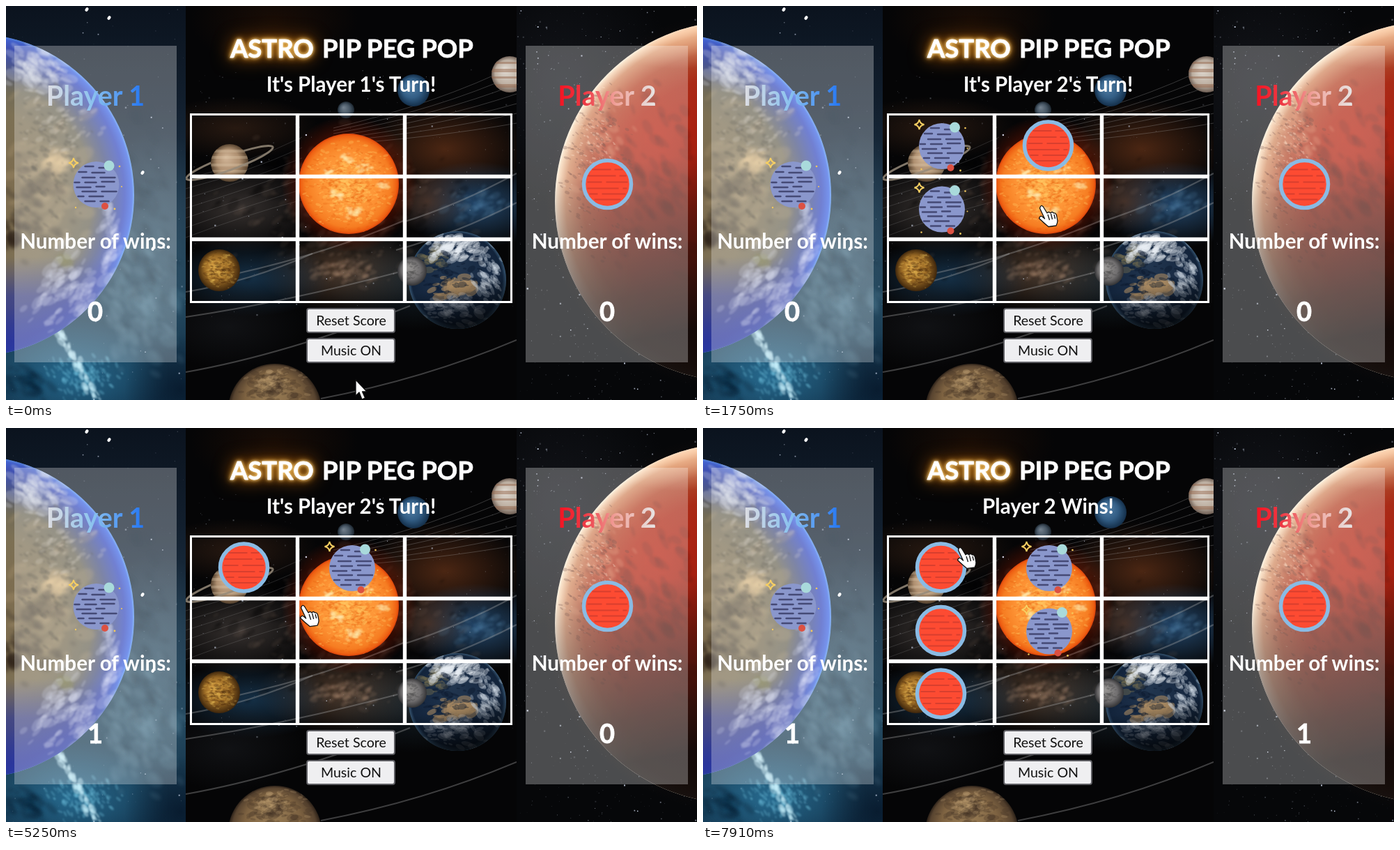
Write an HTML page with a canvas that moves like this. It is 992 px wide and 565 px high and loops after 8000 ms.

```html
<!DOCTYPE html>
<html lang="en">
<head>
<meta charset="utf-8">
<title>Astro Pip Peg Pop</title>
<style>
html, body { margin: 0; width: 992px; height: 565px; overflow: hidden; background: #000; }
canvas, svg { position: absolute; left: 0; top: 0; display: block; }
text { font-family: Lato, "Open Sans", sans-serif; font-weight: 700; fill: #fff; }
.mid { text-anchor: middle; }
.title { font-size: 36.5px; stroke: #fff; stroke-width: .8; stroke-linejoin: round; }
.lit { filter: drop-shadow(0 0 2px #ffdf9c) drop-shadow(0 0 4px #dd9a2a) drop-shadow(0 0 12px #8a4706); }
.status { font-size: 29.5px; }
.name { font-size: 39.5px; }
.wins { font-size: 29.7px; }
.score { font-size: 38px; stroke: #fff; stroke-width: .8; }
.button rect { fill: #efeff1; stroke: #5d5d62; stroke-width: 2; }
.button text { font-size: 19.6px; font-weight: 400; fill: #111; }
</style>
</head>
<body>
<canvas id="sky" width="992" height="565"></canvas>
<svg width="992" height="565" viewBox="0 0 992 565">
  <defs>
    <linearGradient id="blue" gradientUnits="userSpaceOnUse" x1="60" x2="197">
      <stop stop-color="#dcdde3"/><stop offset=".45" stop-color="#8fc4ee"/><stop offset="1" stop-color="#2577f3"/>
    </linearGradient>
    <linearGradient id="red" gradientUnits="userSpaceOnUse" x1="791" x2="934">
      <stop stop-color="#f5101f"/><stop offset=".28" stop-color="#ee3a45"/><stop offset=".6" stop-color="#f0a59d"/><stop offset="1" stop-color="#e6e6e6"/>
    </linearGradient>
    <g id="p0">
      <circle cx="1.5" cy="1" r="33" fill="#8a97cc"/>
      <path transform="translate(1.5 1)" stroke="#454a76" stroke-width="2.4" stroke-linecap="round"
        d="M-16-26H-4M4-24H14M-25-18H-14M-6-17H12M-20-10H-2M6-10H27M-31-3H-24M-16-3H0M8-4H26M-28 4H-8M0 3H12M-20 10H0M8 10H29M-26 17H-18M-10 17H10M-16 24H-2M6 24H18"/>
      <circle cx="20" cy="-26" r="7.5" fill="#a9dadb"/>
      <circle cx="14" cy="32" r="5" fill="#dc5142"/>
      <path d="M-31-37Q-30-31-24-30Q-30-29-31-23Q-32-29-38-30Q-32-31-31-37Z" fill="none" stroke="#f7cf62" stroke-width="2"/>
      <g fill="#f4c95c"><circle cx="35" cy="-25" r="1.3"/><circle cx="38" cy="4" r="1"/><circle cx="28" cy="36" r="1.4"/><circle cx="-28" cy="34" r="1.2"/></g>
    </g>
    <g id="p1">
      <circle r="34" fill="#fd4b32" stroke="#8abbe4" stroke-width="5.5"/>
      <path d="M-22-21H5M10-21H22M-28-12H12M17-12H27M-29-3H-8M-2-3H29M-29 6H16M22 6H28M-26 14H-14M-8 14H26M-19 22H19" stroke="#d83f2e" stroke-width="2"/>
    </g>
  </defs>

  <g fill="#fff" fill-opacity=".28"><path d="M12 57H245V511H12zM746 57H979V511H746z"/></g>
  <text class="title lit" x="322" y="74">ASTRO</text>
  <text class="title" x="454" y="74">PIP PEG POP</text>
  <text class="status mid" id="status" x="495.5" y="123"></text>

  <text class="name mid" x="128.5" y="143" style="fill:url(#blue)">Player 1</text>
  <text class="name mid" x="863" y="143" style="fill:url(#red)">Player 2</text>
  <use href="#p0" x="128" y="255"/>
  <use href="#p1" x="863.5" y="255.5"/>
  <text class="wins mid" x="128.5" y="348">Number of wins:</text>
  <text class="wins mid" x="863" y="348">Number of wins:</text>
  <text class="score mid" id="score0" x="128" y="452"></text>
  <text class="score mid" id="score1" x="863" y="452"></text>

  <g stroke="#fff" fill="none">
    <rect x="265.5" y="155.5" width="460" height="269" stroke-width="3"/>
    <path d="M418.5 155V425M572.5 155V425M265 244.5H726M265 334.5H726" stroke-width="5.4"/>
  </g>
  <g id="board"></g>

  <g class="button mid"><rect x="432" y="434" width="126" height="34" rx="3"/><text x="495.5" y="458">Reset Score</text></g>
  <g class="button mid"><rect x="432" y="477" width="126" height="34" rx="3"/><text x="495.5" y="501">Music ON</text></g>

  <g id="cursor" fill="#fff" stroke="#111" stroke-width="1.3" stroke-linejoin="round">
    <path id="arrow" d="M0 0V23L5 18L9 28L13.500 26L9.500 17H16Z"/>
    <g id="hand">
      <path d="M-3.500 3Q-2-3 1.500 1L7 10Q9 7 12 10Q14 7 16.500 10Q19 9 20.500 13L22 21Q22 24 20 28L9 29.500Q1 23-4.500 17.500Q-3 13 0 15L3.500 18Z"/>
      <path d="M8 12L10.500 20M12.500 11L14.500 19M17 12L18.500 18" fill="none"/>
    </g>
  </g>
</svg>
<script>
const $ = id => document.getElementById(id);
const c = $('sky').getContext('2d');
let seed = 4711;
const rnd = () => (seed = seed * 16807 % 2147483647) / 2147483647;
const spread = () => (rnd() + rnd() + rnd()) / 1.5 - 1;

function glow(x, y, rx, ry, rgb, alpha) {
  c.save();
  c.translate(x, y);
  c.scale(rx, ry);
  const g = c.createRadialGradient(0, 0, 0, 0, 0, 1);
  g.addColorStop(0, `rgba(${rgb},${alpha})`);
  g.addColorStop(.5, `rgba(${rgb},${alpha * .5})`);
  g.addColorStop(1, `rgba(${rgb},0)`);
  c.fillStyle = g;
  c.fillRect(-1, -1, 2, 2);
  c.restore();
}

function specks(n, x, y, sx, sy, size, color, tilt = 0) {
  c.fillStyle = color;
  for (let i = 0; i < n; i++) {
    const s = size * (.3 + rnd() * .7);
    c.beginPath();
    c.ellipse(x + spread() * sx, y + spread() * sy, s, s * (.25 + rnd() * .4), tilt + spread() * .8, 0, 7);
    c.fill();
  }
}

function stars(n, x, y, w, h) {
  for (let i = 0; i < n; i++) {
    c.fillStyle = `rgba(225,235,255,${.15 + rnd() ** 3 * .85})`;
    const s = .6 + rnd() ** 4 * 1.8;
    c.fillRect(x + rnd() * w, y + rnd() * h, s, s);
  }
}

function shade(g, colors) {
  colors.forEach(([at, color]) => g.addColorStop(at, color));
  return g;
}

// Disc with a radial shade whose highlight sits at (hx, hy) radii from the centre.
function ball(x, y, r, colors, hx = 0, hy = 0, detail) {
  c.save();
  c.beginPath();
  c.arc(x, y, r, 0, 7);
  c.clip();
  c.fillStyle = shade(c.createRadialGradient(x + hx * r, y + hy * r, 0, x, y, r), colors);
  c.fillRect(x - r, y - r, 2 * r, 2 * r);
  if (detail) detail();
  c.restore();
}

function panel(x, w, draw) {
  c.save();
  c.beginPath();
  c.rect(x, 0, w, 565);
  c.clip();
  draw();
  c.restore();
}

function curve(x0, y0, x1, y1, x2, y2, alpha = .35) {
  c.strokeStyle = `rgba(170,170,170,${alpha})`;
  c.beginPath();
  c.moveTo(x0, y0);
  c.quadraticCurveTo(x1, y1, x2, y2);
  c.stroke();
}

function drawBluePanel() {
  c.fillStyle = shade(c.createLinearGradient(0, 0, 0, 565),
    [[0, '#0b131e'], [.25, '#121f2e'], [.5, '#1c3346'], [.75, '#1f4258'], [1, '#12324a']]);
  c.fillRect(0, 0, 258, 565);
  glow(215, 340, 100, 160, '70,112,135', .4);
  glow(95, 530, 140, 80, '50,140,185', .6);
  glow(250, 550, 80, 80, '5,20,38', .75);
  c.filter = 'blur(2.5px)';
  specks(90, 190, 430, 90, 130, 17, 'rgba(120,170,190,.13)', .9);
  specks(70, 200, 300, 60, 220, 13, 'rgba(10,28,45,.2)', .9);
  specks(40, 30, 540, 50, 35, 12, 'rgba(8,30,50,.3)', .4);
  c.filter = 'blur(1px)';
  specks(150, 115, 530, 70, 45, 5, 'rgba(130,215,245,.26)', 1);
  for (let i = 0; i < 60; i++) {
    const k = rnd();
    specks(1, 76 + k * 55, 465 + k * 100, 12, 10, 8, 'rgba(205,245,255,.45)', 1.1);
  }
  c.filter = 'none';
  stars(150, 0, 0, 258, 565);
  c.fillStyle = '#fff';
  [[148, 17], [116, 5], [196, 239], [211, 348]].forEach(([x, y]) => {
    c.beginPath(); c.ellipse(x, y, 2.2, 3, .6, 0, 7); c.fill();
  });
  ball(-47, 271, 231, [[0, '#7d6a4c'], [.55, '#7c7054'], [.74, '#6c6858'], [.84, '#4c5682'], [.94, '#3a4fc0'], [.985, '#4068e4'], [1, '#5c9bf5']], 0, 0, () => {
    c.fillStyle = shade(c.createLinearGradient(0, 360, 0, 500), [[0, 'rgba(50,58,140,0)'], [.4, 'rgba(50,58,150,.7)'], [1, 'rgba(38,48,150,.9)']]);
    c.fillRect(0, 360, 200, 145);
    glow(20, 70, 90, 55, '70,84,165', .6);
    c.filter = 'blur(2px)';
    specks(90, 60, 235, 85, 140, 17, 'rgba(176,156,116,.26)', -.5);
    specks(60, 45, 290, 75, 110, 13, 'rgba(52,46,40,.3)', .4);
    specks(14, 75, 228, 25, 22, 14, 'rgba(232,198,140,.4)', -.6);
    specks(12, 8, 340, 14, 35, 13, 'rgba(48,36,26,.5)', 1);
    specks(20, 85, 365, 16, 20, 8, 'rgba(118,116,72,.5)', 1);
    c.filter = 'blur(1px)';
    specks(90, 45, 90, 80, 40, 13, 'rgba(225,228,240,.24)', .5);
    specks(100, 95, 410, 90, 85, 14, 'rgba(225,230,250,.2)', -.7);
    specks(40, 150, 330, 22, 70, 12, 'rgba(225,230,255,.2)', -1.1);
    specks(110, 65, 220, 80, 130, 6, 'rgba(50,45,38,.3)', .5);
    specks(70, 80, 165, 75, 80, 7, 'rgba(230,222,205,.2)', -.4);
    c.filter = 'none';
  });
}

function drawBoardPanel() {
  c.fillStyle = '#050506';
  c.fillRect(258, 0, 475, 565);
  [[630, 205, 120, 70, '112,56,26', .65], [675, 285, 110, 62, '46,92,138', .75],
   [605, 280, 60, 45, '110,66,40', .55],
   [490, 380, 130, 60, '105,78,58', .75], [335, 290, 120, 65, '80,72,68', .65],
   [350, 390, 120, 55, '28,66,98', .7], [330, 175, 120, 45, '62,38,24', .6],
   [580, 395, 120, 70, '34,56,70', .5], [385, 20, 120, 70, '55,24,5', .4],
   [320, 460, 110, 60, '24,26,30', .6]].forEach(a => glow(...a));
  c.filter = 'blur(1.5px)';
  specks(170, 495, 290, 240, 140, 11, 'rgba(160,125,105,.10)', -.4);
  specks(130, 495, 290, 240, 140, 11, 'rgba(0,0,0,.22)', -.4);
  specks(90, 490, 378, 80, 30, 7, 'rgba(175,140,115,.2)', -.3);
  specks(50, 680, 285, 60, 35, 9, 'rgba(95,140,180,.16)', -.3);
  c.filter = 'none';
  stars(260, 258, 90, 475, 360);

  c.lineWidth = 1;
  for (let i = 0; i < 7; i++) {
    curve(470, 175 + i * 4, 620, 140 + i * 8, 733, 84 + i * 14, .3);
    curve(258, 248 + i * 14, 345, 227 + i * 12, 425, 188 + i * 15, .2);
  }
  c.lineWidth = 2;
  [[452, 563, 600, 535, 733, 479], [258, 525, 400, 500, 580, 430], [258, 446, 400, 425, 570, 380],
   [330, 384, 460, 355, 573, 307], [570, 310, 650, 285, 733, 240], [258, 410, 350, 395, 440, 355],
   [560, 350, 650, 325, 733, 282]].forEach(p => curve(...p));

  ball(585, 121, 23, [[0, '#5683aa'], [.6, '#325d84'], [1, '#142f4a']], -.3, -.3);
  ball(488, 149, 12, [[0, '#75828f'], [.6, '#465563'], [1, '#1c262f']], -.3, -.3);
  ball(723, 98, 26, [[0, '#e2dcd4'], [.7, '#bcaea0'], [1, '#6e5f55']], -.3, -.3, () => {
    c.fillStyle = 'rgba(150,104,78,.5)';
    [80, 90, 101, 112].forEach((y, i) => c.fillRect(695, y, 60, 3 + i % 2 * 2));
  });

  const ring = (from, to) => {
    c.strokeStyle = 'rgba(150,138,122,.85)';
    c.lineWidth = 3;
    c.beginPath();
    c.ellipse(321, 225, 66, 10, -.35, from, to);
    c.stroke();
  };
  ring(Math.PI, 2 * Math.PI);
  ball(321, 225, 27, [[0, '#d2b698'], [.6, '#ae8f70'], [1, '#57432f']], -.2, -.3, () => {
    c.fillStyle = 'rgba(225,205,175,.3)';
    [206, 215, 226, 235].forEach(y => c.fillRect(290, y, 62, 4));
  });
  ring(0, Math.PI);

  glow(493, 255, 98, 98, '190,35,0', 1);
  ball(492, 255, 72, [[0, '#ffa947'], [.6, '#fd9335'], [.86, '#f67d22'], [.96, '#ee5f12'], [1, '#d9420b']], 0, 0, () => {
    specks(380, 492, 255, 85, 85, 4, 'rgba(225,90,10,.24)');
    specks(420, 492, 255, 75, 75, 4, 'rgba(255,205,105,.3)');
    c.filter = 'blur(1px)';
    [[488, 218], [472, 270], [515, 232], [542, 257], [462, 240], [500, 295]].forEach(([x, y]) =>
      specks(16, x, y, 15, 11, 5, 'rgba(255,242,185,.48)'));
    c.filter = 'none';
  });

  ball(306, 379, 30, [[0, '#d19a3f'], [.6, '#9a6a25'], [1, '#3e260c']], -.25, -.25, () => {
    specks(120, 306, 379, 32, 32, 4, 'rgba(235,190,90,.24)');
    specks(90, 306, 379, 32, 32, 4, 'rgba(75,42,10,.3)');
  });

  ball(648, 393, 70, [[0, '#22364f'], [.6, '#182a43'], [.93, '#12233a'], [1, '#35536f']], -.1, -.3, () => {
    c.filter = 'blur(.7px)';
    specks(55, 645, 403, 42, 22, 11, 'rgba(170,138,98,.6)', -.3);
    specks(35, 615, 360, 30, 25, 8, 'rgba(112,106,78,.45)');
    specks(110, 640, 345, 65, 26, 10, 'rgba(232,238,244,.36)', -.5);
    specks(70, 692, 385, 30, 50, 8, 'rgba(220,228,240,.3)', .9);
    specks(70, 645, 435, 60, 30, 9, 'rgba(210,218,230,.24)', .3);
    specks(50, 645, 385, 65, 50, 7, 'rgba(10,22,42,.4)');
    c.filter = 'none';
    c.fillStyle = shade(c.createLinearGradient(640, 400, 655, 463), [[0, 'rgba(0,0,0,0)'], [.5, 'rgba(0,0,0,.4)'], [1, 'rgba(0,0,0,.8)']]);
    c.fillRect(570, 320, 160, 150);
  });
  ball(583, 380, 21, [[0, '#989694'], [.65, '#716f70'], [1, '#333335']], -.25, -.25, () =>
    specks(30, 583, 380, 22, 22, 4, 'rgba(60,60,62,.3)'));
  ball(386, 580, 67, [[0, '#9c8058'], [.6, '#7d6241'], [.9, '#584430'], [1, '#2c2118']], -.1, -.55, () => {
    specks(90, 386, 550, 68, 40, 9, 'rgba(60,46,34,.25)');
    specks(55, 380, 535, 60, 25, 6, 'rgba(195,165,120,.22)');
  });
}

function drawRedPanel() {
  c.fillStyle = '#060709';
  c.fillRect(733, 0, 259, 565);
  glow(800, 110, 160, 180, '30,33,42', .5);
  stars(650, 733, 0, 259, 565);
  glow(1046, 280, 272, 272, '150,80,55', .4);
  ball(1046, 280, 258, [[0, '#8a1a0d'], [.45, '#991f10'], [.7, '#a52b17'], [.84, '#b04a2c'], [.94, '#d28c62'], [.985, '#f5d3b0'], [1, '#fff2dc']], 0, 0, () => {
    glow(935, 190, 110, 120, '205,40,20', .55);
    glow(965, 30, 120, 60, '255,205,170', .7);
    c.filter = 'blur(1.5px)';
    specks(90, 925, 240, 110, 190, 16, 'rgba(80,20,14,.2)', .9);
    specks(60, 855, 180, 55, 140, 10, 'rgba(245,175,130,.2)', .9);
    c.filter = 'blur(.6px)';
    specks(220, 845, 230, 65, 180, 4, 'rgba(80,32,22,.3)', .5);
    specks(140, 845, 200, 60, 160, 3, 'rgba(255,225,195,.32)', .5);
    c.filter = 'none';
    c.fillStyle = shade(c.createLinearGradient(905, 225, 950, 470), [[0, 'rgba(35,10,6,0)'], [.4, 'rgba(35,12,8,.5)'], [.75, 'rgba(28,12,9,.85)'], [1, 'rgba(14,8,7,.96)']]);
    c.fillRect(780, 20, 212, 530);
  });
}

panel(0, 258, drawBluePanel);
panel(258, 475, drawBoardPanel);
panel(733, 259, drawRedPanel);

const LOOP = 8000, STEP = 70;
const cells = [[0, 0], [1, 0], [0, 1], [1, 1], [0, 2]];
const games = [
  { start: 0, first: 0, clicks: [560, 1050, 1470, 1820, 2380] },
  { start: 4410, first: 1, clicks: [4480, 4970, 5390, 5880, 6440] }
];
// time, x, y of the pointer tip
const path = [
  [0, 502, 536], [490, 383, 213], [630, 382, 211], [980, 492, 206], [1120, 491, 208],
  [1400, 380, 288], [1470, 379, 290], [1750, 487, 287], [1890, 487, 290], [2310, 388, 370],
  [2590, 388, 370], [2660, 384, 372], [3430, 384, 372], [3920, 379, 209], [4270, 379, 209],
  [4340, 377, 206], [4550, 374, 204], [4900, 490, 202], [5070, 490, 204], [5390, 384, 290],
  [5530, 384, 290], [5810, 488, 288], [5950, 487, 290], [6370, 386, 370], [7280, 386, 370],
  [7350, 388, 376], [7420, 388, 376], [7910, 370, 172], [LOOP, 370, 172]
];

const pieces = cells.map(([col, row]) => {
  const use = document.createElementNS('http://www.w3.org/2000/svg', 'use');
  use.setAttribute('x', 341.5 + col * 154);
  use.setAttribute('y', 200 + row * 90.500);
  return $('board').appendChild(use);
});

function pointer(t) {
  const i = path.findIndex(p => p[0] > t);
  const [t0, x0, y0] = path[i - 1], [t1, x1, y1] = path[i];
  const k = (t - t0) / (t1 - t0), ease = k * k * (3 - 2 * k);
  return [x0 + (x1 - x0) * ease, y0 + (y1 - y0) * ease];
}

function render(t) {
  const game = games[t >= games[1].start ? 1 : 0];
  const n = game.clicks.filter(at => at <= t).length;
  pieces.forEach((piece, i) => {
    piece.setAttribute('href', '#p' + (game.first + i) % 2);
    piece.style.visibility = i < n ? 'visible' : 'hidden';
  });
  $('status').textContent = n === cells.length
    ? `Player ${game.first + 1} Wins!`
    : `It's Player ${(game.first + n) % 2 + 1}'s Turn!`;
  games.forEach((g, i) => { $('score' + i).textContent = t >= g.clicks[4] ? 1 : 0; });

  const [x, y] = pointer(t);
  const overControl = y < 512;
  $('cursor').setAttribute('transform', `translate(${x} ${y})`);
  $('hand').style.display = overControl ? '' : 'none';
  $('arrow').style.display = overControl ? 'none' : '';
}

const begin = performance.now();
function tick() {
  const t = (performance.now() - begin) % LOOP;
  render(Math.floor(t / STEP) * STEP);
  requestAnimationFrame(tick);
}
tick();
</script>
</body>
</html>
```
